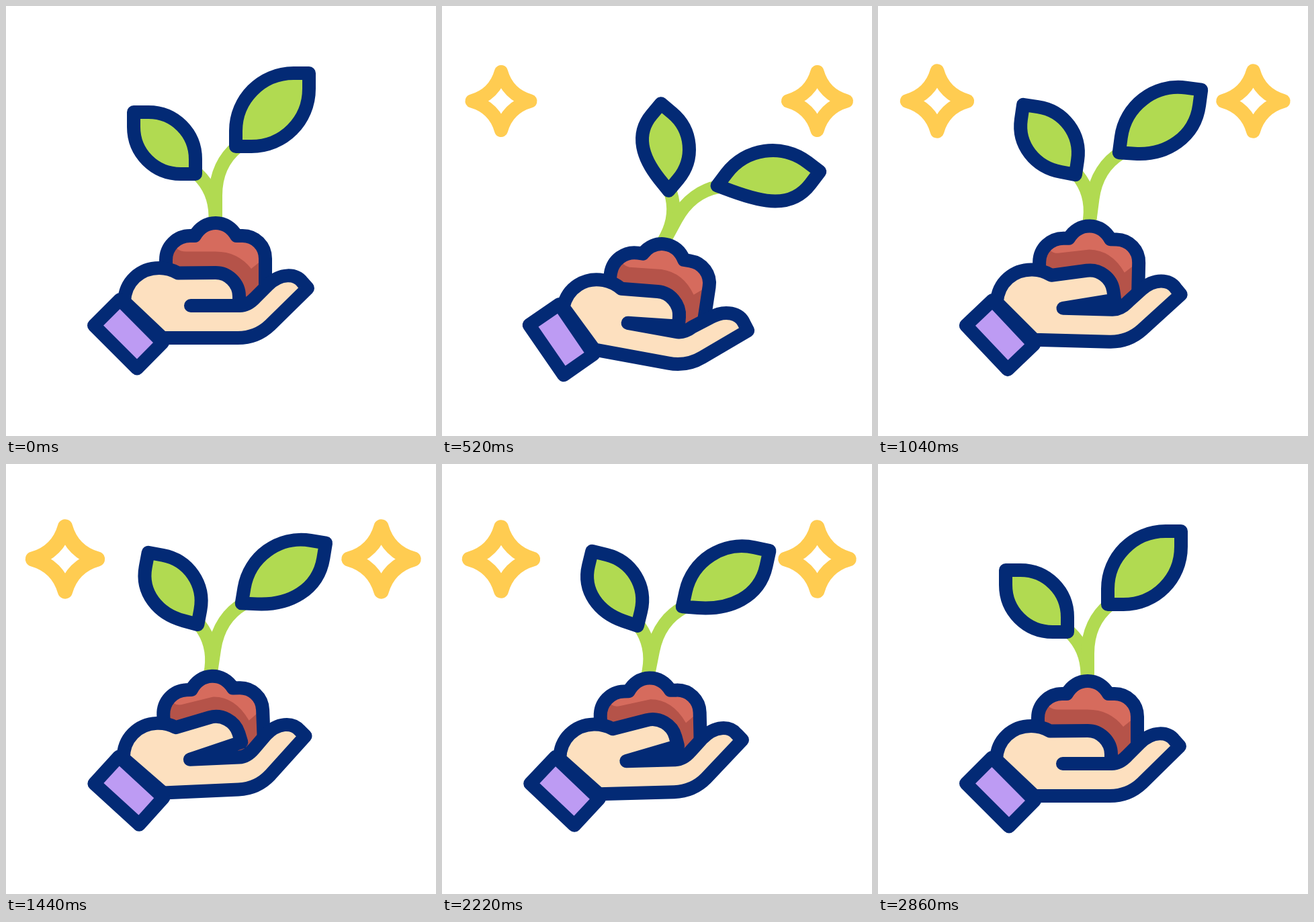
These frames come from a looping animation (640 px wide and 640 px high, 3 s). An HTML page with a canvas:

```html
<!DOCTYPE html>
<html>
<head>
<meta charset="utf-8">
<style>
html, body { margin: 0; width: 100%; height: 100%; overflow: hidden; background: #fff; }
canvas { display: block; width: 640px; height: 640px; }
</style>
</head>
<body>
<canvas id="stage" width="640" height="640"></canvas>
<script>
const ctx = document.getElementById('stage').getContext('2d');
const NAVY = '#032a75', GREEN = '#b1da51', YELLOW = '#ffcc51', SKIN = '#fde0bf';
const CLAY = '#d66b5d', DARK_CLAY = '#b55349', PURPLE = '#bd9bf3';

// Swing tracks: start, first peak, alternating extremes, rest.
const swing = (first, low, high, lag = 0) => [
  [0, 0], [400 + lag, first], [800 + lag, low], [1200 + lag, high],
  [1600 + lag, low], [2000 + lag, high], [2400 + lag, low], [2850, 0]
];
const tracks = {
  hand: swing(15, -7, 6),
  thumb: swing(-2, -20, -4),
  stem: swing(19, -3, 20, 70),
  leaf: swing(28, -4, 22, 70),
  star: [[0, 0], [200, 1.2], [400, .96], [800, 1.2], [1200, .96], [1600, 1.2],
    [2000, .96], [2400, 1.2], [2600, .96], [2860, 0]]
};

function sample(keys, t) {
  const i = keys.findIndex(k => k[0] > t);
  if (i < 0) return keys[keys.length - 1][1];
  const [t0, a] = keys[i - 1], [t1, b] = keys[i];
  return a + (b - a) * (1 - Math.cos(Math.PI * (t - t0) / (t1 - t0))) / 2;
}

const rad = deg => deg * Math.PI / 180;

// Returns a function that turns a point about (cx, cy) and gives it as path text.
function turner(cx, cy, deg) {
  const c = Math.cos(rad(deg)), s = Math.sin(rad(deg));
  return (x, y) => {
    const dx = x - cx, dy = y - cy;
    return `${cx + dx * c - dy * s} ${cy + dx * s + dy * c} `;
  };
}

function rotateAt(x, y, deg) {
  ctx.translate(x, y);
  ctx.rotate(rad(deg));
  ctx.translate(-x, -y);
}

function scoped(draw) {
  ctx.save();
  draw();
  ctx.restore();
}

function shape(d, fill, stroke) {
  const path = new Path2D(d);
  if (fill) {
    ctx.fillStyle = fill;
    ctx.fill(path);
  }
  if (stroke) {
    ctx.strokeStyle = stroke;
    ctx.stroke(path);
  }
}

function star(x, y, scale) {
  if (scale < .01) return;
  scoped(() => {
    ctx.translate(x, y);
    ctx.scale(scale, scale);
    shape('M0-43Q9.5-9.5 43 0Q9.5 9.5 0 43Q-9.5 9.5-43 0Q-9.5-9.5 0-43Z', null, YELLOW);
  });
}

function plant(stem, leaf) {
  rotateAt(312, 312, stem);
  shape('M311.5 345V312C311 287 302 266 285 250', null, GREEN);
  shape('M312 345V282C312 250 325 225 345 209', null, GREEN);

  // The outer side of each leaf flattens as it leans.
  scoped(() => {
    rotateAt(282, 250, leaf * 1.1 - stem);
    const bend = turner(282, 250, .4 * leaf);
    shape('M190 158H212C251 158 282 189 282 228V250L' + bend(260, 250) +
      'C' + bend(221, 250) + '190 219 190 180Z', GREEN, NAVY);
  });

  scoped(() => {
    rotateAt(342, 209, leaf - stem);
    const bend = turner(342, 209, -.6 * leaf);
    shape('M342 209V186C342 139 380 100 428 100H451V123C451 171 ' +
      bend(413, 209) + bend(365, 209) + 'Z', GREEN, NAVY);
  });
}

function soil(lift) {
  const outline = 'M238 392V378C238 358 254 342 274 342H281C288 330 299 323 312 323' +
    'S336 330 343 342H352C371 342 386 357 386 376V425';
  const crest = 365.5 - lift;
  shape(outline + 'L345 446H250Z', CLAY);
  shape(`M240 352L254 361Q260 365.5 268 ${365.5 - lift * .2}L312 ${crest}` +
    `Q345 ${crest} 365 391L386 374V425L345 446H250L238 392Z`, DARK_CLAY);
  shape(outline, null, NAVY);
}

function hand(thumb, finger) {
  const th = turner(262, 413, thumb), fi = turner(375, 480, finger);
  shape('M176 440C177 410 200 390 228 390Q243 390 256 397.5L' + th(312, 397) +
    'C' + th(331, 397) + th(347, 413) + th(347, 432) + 'L' + th(347, 446) +
    'L275 446H348Q360 446 371 434L' + fi(390, 415) +
    'C' + fi(409, 397) + fi(431, 398) + fi(441, 411) + 'L' + fi(449, 420) +
    'L' + fi(393, 475) + 'Q373 494 345 494H233Z', SKIN, NAVY);
  shape('M131 475.5L169.5 437L233 501L195 539.5Z', PURPLE, NAVY);
}

function render(t) {
  const pose = {};
  for (const name in tracks) pose[name] = sample(tracks[name], t);
  ctx.fillStyle = '#fff';
  ctx.fillRect(0, 0, 640, 640);
  ctx.lineWidth = 20;
  ctx.lineCap = ctx.lineJoin = 'round';
  star(88, 141.5, pose.star);
  star(558.5, 141.5, pose.star);
  scoped(() => {
    rotateAt(134, 468, pose.hand);
    scoped(() => {
      const tilt = -.17 * pose.hand;
      rotateAt(232, 430, tilt);
      scoped(() => plant(pose.stem - tilt, pose.leaf - tilt));
      soil(-.8 * pose.thumb);
    });
    hand(pose.thumb, pose.hand * .35);
  });
}

const start = performance.now();
function tick() {
  render((performance.now() - start) % 3000);
  requestAnimationFrame(tick);
}
tick();
</script>
</body>
</html>
```
